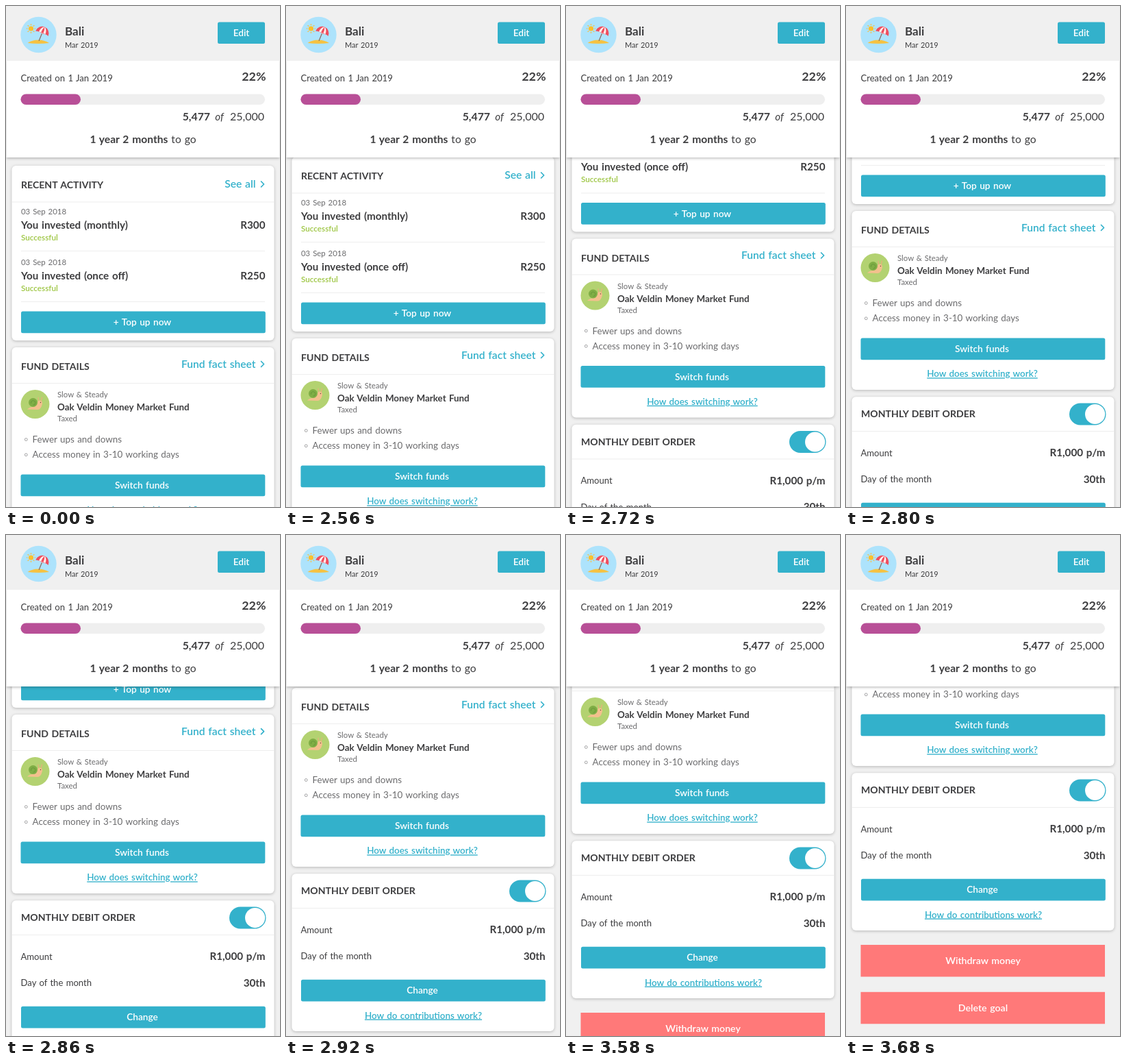
Animation of 400 by 731 pixels, one loop 6.2 s. Source, as an HTML page:

```html
<!DOCTYPE html>
<html lang="en">
<head>
<meta charset="utf-8">
<title>Savings goal</title>
<style>
  html, body { margin: 0; width: 100%; height: 100%; overflow: hidden; background: #f0f0f0; }
  svg { position: fixed; inset: 0; width: 100%; height: 100%; display: block; }
  text { font-family: Lato, "Open Sans", sans-serif; fill: #3d3d3f; word-spacing: 1px; }
  .b { font-weight: 700; }
  .small { font-size: 11.4px; fill: #6b6b6d; }
  .body { font-size: 13.1px; }
  .item { font-size: 13.4px; fill: #6b6b6d; }
  .head { font-size: 14.1px; font-weight: 700; }
  .row { font-size: 15.2px; font-weight: 700; }
  .more { font-size: 15.6px; font-weight: 600; fill: #33b1cb; }
  .ok { font-size: 11.7px; font-weight: 600; fill: #9cc540; }
  .link { font-size: 13.4px; font-weight: 600; fill: #33b1cb; text-decoration: underline; }
  .label { font-size: 13.7px; font-weight: 600; fill: #fff; }
  .big { font-size: 14.2px; font-weight: 600; fill: #fff; }
  .card { fill: #fff; filter: drop-shadow(0 1px 2px rgba(0, 0, 0, .24)); }
  .panel { fill: #fff; filter: drop-shadow(0 1px 2px rgba(0, 0, 0, .3)); }
</style>
</head>
<body>
<svg id="stage" viewBox="0 0 400 731" preserveAspectRatio="none"></svg>
<script>
const LOOP = 6200, STEP = 20;
const TEAL = '#33b1cb', CORAL = '#ff7979';

const text = (x, y, cls, str, anchor = 'start', extra = '') =>
  `<text x="${x}" y="${y}" class="${cls}" text-anchor="${anchor}" ${extra}>${str}</text>`;
const rect = (x, y, w, h, fill, r = 0) =>
  `<rect x="${x}" y="${y}" width="${w}" height="${h}" rx="${r}" fill="${fill}"/>`;
const circle = (x, y, r, fill, extra = '') =>
  `<circle cx="${x}" cy="${y}" r="${r}" fill="${fill}" ${extra}/>`;
const path = (d, fill, extra = '') => `<path d="${d}" fill="${fill}" ${extra}/>`;
const stroke = (color, width) =>
  `stroke="${color}" stroke-width="${width}" stroke-linecap="round" stroke-linejoin="round"`;
const card = (y, h) => `<rect class="card" x="8.5" y="${y}" width="383" height="${h}" rx="6"/>`;
const divider = (y, x = 9) => rect(x, y, 400 - 2 * x, 1, '#eeeeee');
const button = (y, str, x = 22) =>
  rect(x, y, 356.8, 31.7, TEAL, 2.5) + text(x + 177, y + 20.5, 'label', str, 'middle');
const wideButton = (y, str) =>
  rect(21.5, y, 356.5, 46.5, CORAL) + text(200, y + 28, 'big', str, 'middle');
const more = (y, str) =>
  text(364.5, y, 'more', str, 'end') +
  path(`M372.5 ${y - 9}l4 4-4 4`, 'none', stroke(TEAL, 1.7));

function beach() {
  const rays = [0, 45, 90, 135, 180, 225, 270, 315].map(a =>
    `<path d="M0-5.3v-1" ${stroke('#f9bd3e', 1.2)} transform="translate(36.5 33) rotate(${a})"/>`);
  return circle(47.5, 42, 26.2, '#ade3fc') + rays.join('') + circle(36.5, 33, 3.6, '#fbc02d') +
    path('M31.5 54Q38 49.5 47 49.5T63 54Q47 56 31.5 54Z', '#f5c242') +
    `<g transform="translate(53.5 37.5) rotate(22)">
      ${path('M0 0V14', 'none', stroke('#8a6a5c', 1.2))}
      ${path('M-10 3A10 10.5 0 0 1 10 3Q5 1 0 3Q-5 1-10 3Z', '#ee4f5f')}
      ${path('M-5 2Q-5-5 0-7.5Q5-5 5 2Q2.5 1 0 3Q-2.5 1-5 2Z', '#fff3f0')}
      ${path('M-1.8 2Q-2-4 0-7.5Q2-4 1.8 2Z', '#ee4f5f')}
    </g>`;
}

function snail() {
  return circle(42.5, 581, 21, '#b3d271') +
    path('M48 577l-1-6M51 577l1.5-6', 'none', stroke('#e9ae7c', 1.2)) +
    path('M31 588.5Q35 584.5 43 584Q45 575.5 49.5 575.5Q54.5 576.5 52.5 582Q51 588.5 46 589Z', '#f3c08d') +
    circle(39.5, 578.5, 6.5, '#7fae45') +
    path('M36.5 579.5a3.2 3.2 0 1 1 3.6 2.6', 'none', stroke('#6b9a3c', 1.1)) +
    circle(50.5, 578.5, .7, '#5b4636');
}

function activity(y, title, sum) {
  return text(22, y, 'small', '03 Sep 2018') + text(22, y + 21, 'row', title) +
    text(378.5, y + 21, 'row', sum, 'end') + text(22, y + 38, 'ok', 'Successful');
}

const bullet = (y, str) =>
  circle(29.3, y - 4.5, 1.9, 'none', 'stroke="#8a8a8c" stroke-width=".8"') + text(38.5, y, 'item', str);

const field = (y, name, value) =>
  text(21.5, y, 'body', name) + text(378.5, y + .5, 'row', value, 'end');

const content =
  card(233, 255) + text(22, 265.5, 'head', 'RECENT ACTIVITY') + more(265, 'See all') + divider(285.5) +
  activity(304, 'You invested (monthly)', 'R300') + divider(357, 22) +
  activity(377.5, 'You invested (once off)', 'R250') + divider(431, 22) +
  button(445.5, '+ Top up now') +

  card(498, 261) + text(22, 531, 'head', 'FUND DETAILS') + more(527.5, 'Fund fact sheet') + divider(550) +
  snail() + text(75, 571, 'small', 'Slow &amp; Steady') +
  text(75, 590, 'b', 'Oak Veldin Money Market Fund', 'start', 'font-size="13.4"') +
  text(75, 606, 'small', 'Taxed') +
  bullet(637, 'Fewer ups and downs') + bullet(659.3, 'Access money in 3-10 working days') +
  button(683.5, 'Switch funds', 21.5) + text(199, 740.3, 'link', 'How does switching work?', 'middle') +

  card(769.3, 229.7) + text(22, 799, 'head', 'MONTHLY DEBIT ORDER') +
  rect(326, 778.5, 53.5, 32, TEAL, 16) + circle(363.6, 794.5, 14.6, '#fff') + divider(819) +
  field(855.5, 'Amount', 'R1,000 p/m') + field(894, 'Day of the month', '30th') +
  button(923.7, 'Change') + text(200.5, 980.5, 'link', 'How do contributions work?', 'middle') +

  wideButton(1020, 'Withdraw money') + wideButton(1088.8, 'Delete goal');

const header =
  '<rect class="panel" x="0.5" y="79" width="399" height="142"/>' +
  rect(0, 0, 400, 80, '#f0f0f0') +
  beach() + text(86, 43, 'b', 'Bali', 'start', 'font-size="17"') +
  text(86, 61, '', 'Mar 2019', 'start', 'font-size="11"') +
  rect(309, 23.5, 69, 31.5, TEAL, 2.5) + text(343.5, 43.8, 'label', 'Edit', 'middle') +
  text(21.5, 110, 'body', 'Created on 1 Jan 2019') +
  text(379.5, 109, 'b', '22%', 'end', 'font-size="17.8"') +
  rect(21.5, 128.5, 356.5, 15.5, '#efefef', 7.75) + rect(21.5, 128.5, 87.5, 15.5, '#b84f97', 7.75) +
  text(298, 167, 'b', '5,477', 'end', 'font-size="15.8"') +
  text(311.5, 167, '', 'of', 'middle', 'font-size="15" font-style="italic"') +
  text(377, 167, '', '25,000', 'end', 'font-size="16"') +
  text(200, 200, '', '<tspan class="b">1 year 2 months</tspan> to go', 'middle', 'font-size="15.6"');

document.getElementById('stage').innerHTML =
  rect(0, 0, 400, 731, '#f0f0f0') + `<g id="page">${content}</g>` + header;
const page = document.getElementById('page');

// Swipe keys: time in ms, scroll in px, speed in px/ms
const keys = [
  [0, 0, 0], [2540, 0, 0], [2560, 13, .95], [2640, 102, .95], [2800, 199, .55],
  [2920, 275, .62], [3000, 310, 0], [3560, 310, 0], [3580, 323, .95], [3680, 422, .7]
];

function scrollAt(t) {
  const i = keys.findIndex(k => k[0] > t);
  if (i < 0) return keys[keys.length - 1][1];
  const [t0, y0, v0] = keys[i - 1], [t1, y1, v1] = keys[i];
  const d = t1 - t0, u = (t - t0) / d, w = 1 - u;
  return w * w * ((1 + 2 * u) * y0 + u * d * v0) + u * u * ((3 - 2 * u) * y1 - w * d * v1);
}

function draw(t) {
  const y = scrollAt(Math.floor(t / STEP) * STEP);
  page.setAttribute('transform', `translate(0 ${-y.toFixed(2)})`);
}

const start = performance.now();
function tick() {
  draw((performance.now() - start) % LOOP);
  requestAnimationFrame(tick);
}
tick();
</script>
</body>
</html>
```
